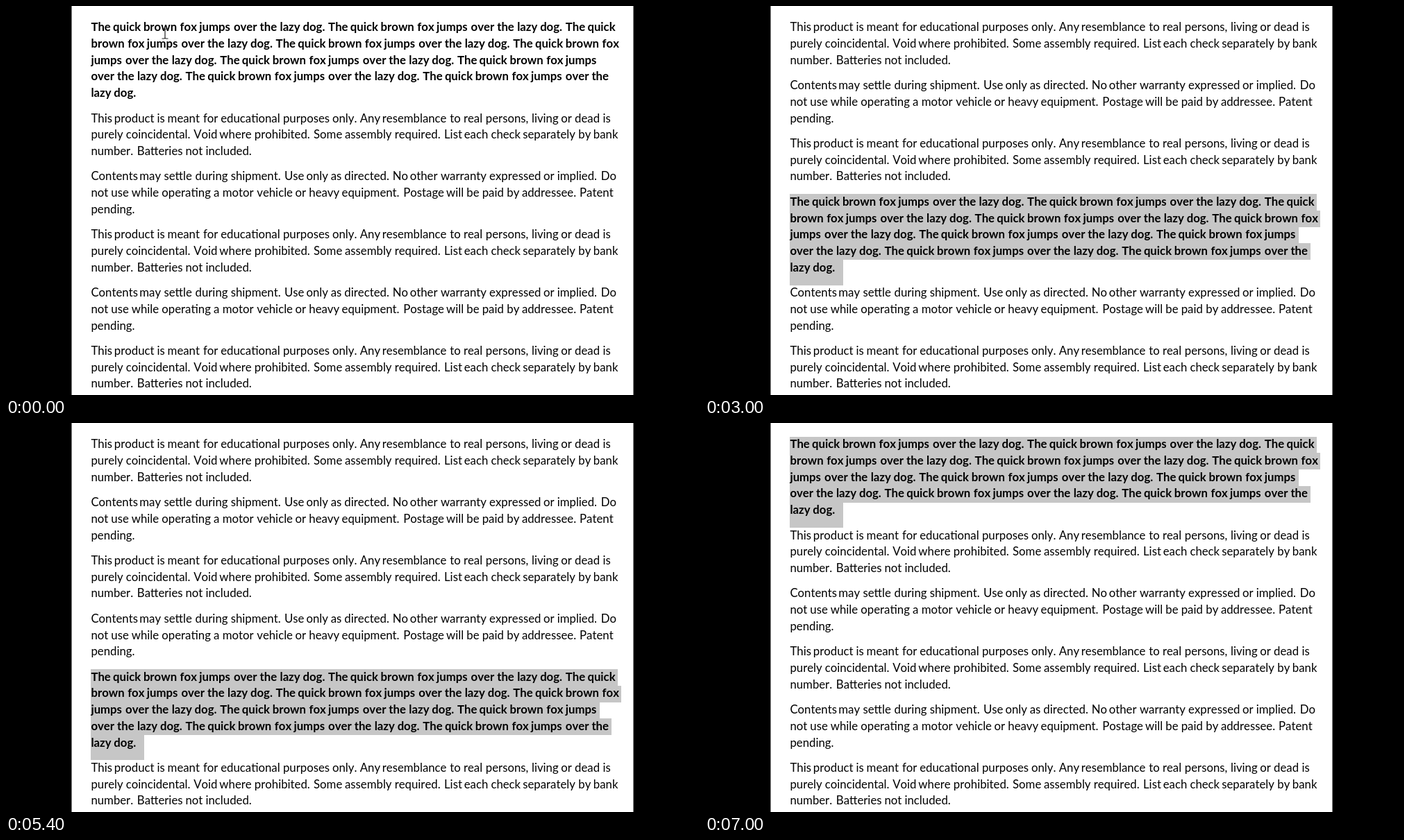
Recreate the animation shown at these times as an HTML page. Size 998 by 561 pixels, loop 8800 ms.

```html
<!DOCTYPE html>
<html lang="en">
<head>
<meta charset="utf-8">
<style>
  html, body { margin: 0; width: 100%; height: 100%; overflow: hidden; background: #000; }
  svg { display: block; width: 998px; height: 561px; }
  text { font-family: Carlito, Lato, sans-serif; font-kerning: none; fill: #000; }
</style>
</head>
<body>
<svg id="stage" viewBox="0 0 998 561">
  <rect width="998" height="561" fill="#000"/>
  <rect x="94.5" width="809" height="561" fill="#fff"/>
</svg>
<script>
const stage = document.getElementById('stage');
const EM = 17.95, LEFT = 122.4, TOP = 19.7, LINE = 23.7, BASE = 16.6, GAP = 12.75;
const LOOP = 8800;

// Advance widths in thousandths of an em, in the order of the key string.
const advances = (keys, list) => Object.fromEntries([...keys].map((k, i) => [k, list[i] / 1000]));
const lower = 'abcdefghijklmnopqrstuvwxyz ';
const STYLES = {
  400: advances(lower + '.,TAVSLBCUDNP', [
    479, 525, 423, 525, 498, 305, 471, 525, 229, 239, 455, 229, 799, 525, 527, 525, 525,
    349, 391, 335, 525, 452, 715, 433, 453, 395, 226,
    252, 250, 487, 579, 567, 459, 420, 544, 533, 642, 615, 646, 517]),
  700: advances(lower + '.T', [
    494, 537, 418, 537, 503, 316, 474, 537, 246, 255, 480, 246, 813, 537, 538, 537, 537,
    355, 399, 347, 537, 473, 745, 459, 474, 397, 226,
    267, 495])
};

const FOX = [
  'The quick brown fox jumps over the lazy dog. The quick brown fox jumps over the lazy dog. The quick',
  'brown fox jumps over the lazy dog. The quick brown fox jumps over the lazy dog. The quick brown fox',
  'jumps over the lazy dog. The quick brown fox jumps over the lazy dog. The quick brown fox jumps',
  'over the lazy dog. The quick brown fox jumps over the lazy dog. The quick brown fox jumps over the',
  'lazy dog.'];
const PRODUCT = [
  'This product is meant for educational purposes only. Any resemblance to real persons, living or dead is',
  'purely coincidental. Void where prohibited. Some assembly required. List each check separately by bank',
  'number. Batteries not included.'];
const CONTENTS = [
  'Contents may settle during shipment. Use only as directed. No other warranty expressed or implied. Do',
  'not use while operating a motor vehicle or heavy equipment. Postage will be paid by addressee. Patent',
  'pending.'];

function el(name, attrs, parent) {
  const node = document.createElementNS('http://www.w3.org/2000/svg', name);
  for (const k in attrs) node.setAttribute(k, attrs[k]);
  parent.appendChild(node);
  return node;
}

const widthOf = (s, weight) => [...s].reduce((w, c) => w + STYLES[weight][c], 0) * EM;

// Type size at which the installed face sets words as wide as the layout expects.
const pen = document.createElement('canvas').getContext('2d');
function sizeFor(weight, lines) {
  const words = lines.join(' ').split(' ');
  pen.font = weight + ' 100px Carlito, Lato, sans-serif';
  pen.fontKerning = 'none';
  const real = words.reduce((w, s) => w + pen.measureText(s).width, 0);
  return 100 * widthOf(words.join(''), weight) / real;
}
const SIZES = { 400: sizeFor(400, PRODUCT.concat(CONTENTS)), 700: sizeFor(700, FOX) };

function paragraph(lines, weight) {
  const g = el('g', {}, stage);
  const mark = el('path', { fill: '#c6c6c6', 'shape-rendering': 'crispEdges' }, g);
  const rows = lines.map(line => {
    const row = el('text', { 'font-size': SIZES[weight], 'font-weight': weight }, g);
    let x = LEFT;
    for (const word of line.split(' ')) {
      el('tspan', { x: x.toFixed(2) }, row).textContent = word;
      x += widthOf(word + ' ', weight);
    }
    return { row, end: x };
  });
  const height = lines.length * LINE + GAP;

  function place(y, selected) {
    rows.forEach(({ row }, i) => row.setAttribute('y', Math.round(y + i * LINE + BASE)));
    let d = '';
    if (selected) {
      rows.forEach(({ end }, i) => {
        const last = i === rows.length - 1;
        const y0 = Math.round(y + i * LINE);
        const y1 = Math.round(last ? y + height : y + (i + 1) * LINE);
        const x1 = Math.round(last ? end + 7 : end);
        d += `M122 ${y0}H${x1}V${y1}H122Z`;
      });
    }
    mark.setAttribute('d', d);
  }
  return { height, place };
}

const fox = paragraph(FOX, 700);
const others = [PRODUCT, CONTENTS, PRODUCT, CONTENTS, PRODUCT].map(p => paragraph(p, 400));

const caret = el('rect', { x: 282, y: 67, width: 1.6, height: 22 }, stage);
const beam = el('path', {
  d: 'M-4.5 -6.5H-1L0 -5.5L1 -6.5H4.5M0 -5.5V6.5M-4.5 7.5H-1L0 6.5L1 7.5H4.5',
  fill: 'none', stroke: '#222', 'stroke-width': 1.2
}, stage);

// [time, slot of the bold paragraph]
const MOVES = [[0, 0], [2200, 1], [2600, 2], [3000, 3], [3600, 2], [4000, 1], [4400, 2],
  [5000, 3], [5400, 4], [5800, 3], [6200, 2], [6600, 1], [7000, 0]];
const BLINKS = [[600, 800], [1200, 1600], [2000, 2200]];

const show = (node, on) => node.setAttribute('visibility', on ? 'visible' : 'hidden');
let lastSlot = null;

function layout(slot, selected) {
  const key = slot + '/' + selected;
  if (key === lastSlot) return;
  lastSlot = key;
  const order = others.slice();
  order.splice(slot, 0, fox);
  let y = TOP;
  for (const p of order) {
    p.place(y, selected && p === fox);
    y += p.height;
  }
}

function render(t) {
  const slot = MOVES.filter(m => m[0] <= t).pop()[1];
  layout(slot, t >= 2200);
  show(caret, BLINKS.some(([a, b]) => t >= a && t < b));
  show(beam, t < 400);
  beam.setAttribute('transform', t < 200 ? 'translate(229 39.5)' : 'translate(283 78)');
}

function frame() {
  render(performance.now() % LOOP);
  requestAnimationFrame(frame);
}
frame();
</script>
</body>
</html>
```
